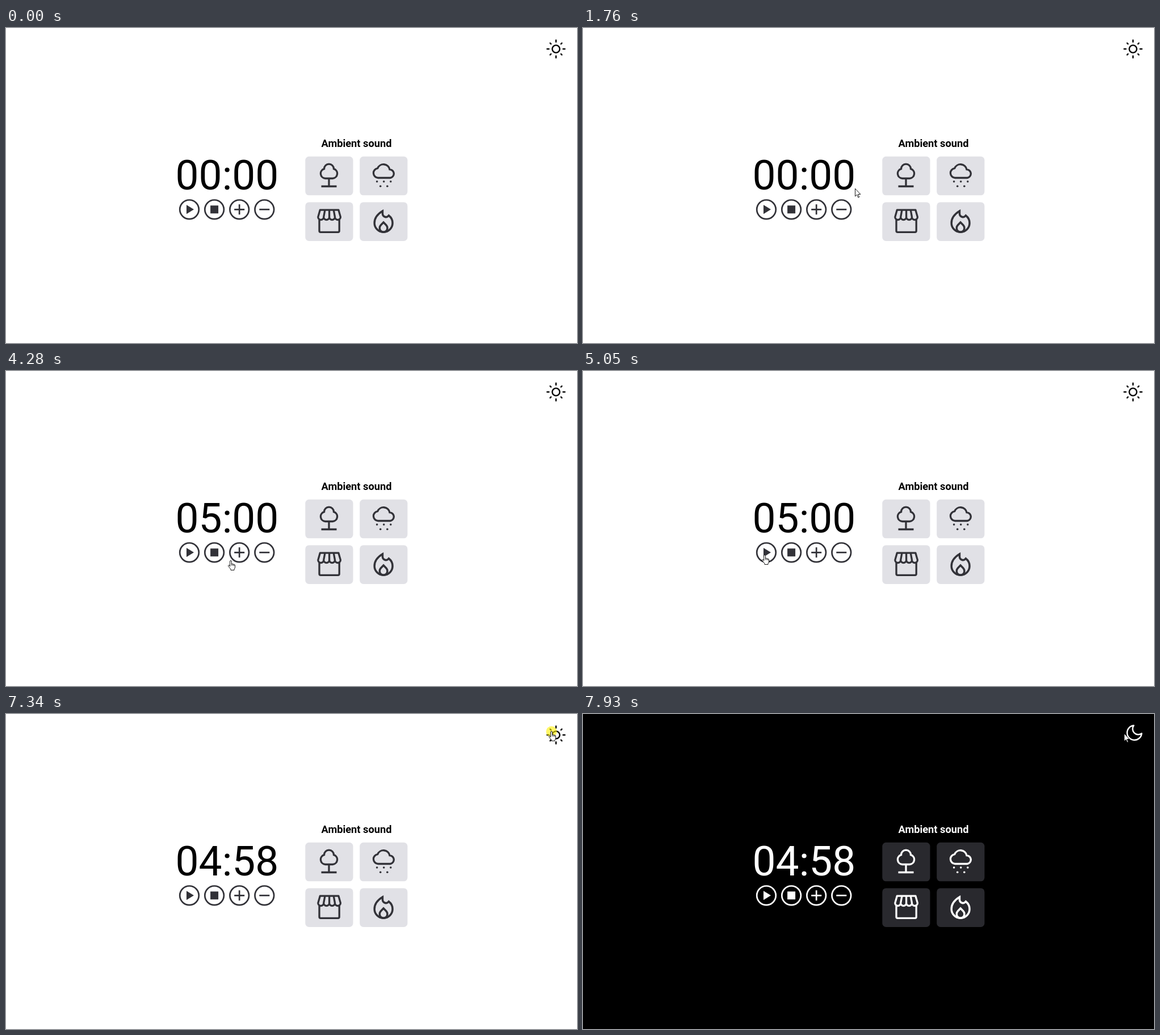
An HTML page that plays this animation: 1006 px wide and 556 px high, repeating every 7990 ms.

```html
<!DOCTYPE html>
<html lang="en">
<head>
<meta charset="utf-8">
<title>Focus timer</title>
<style>
  html, body { margin: 0; width: 100%; height: 100%; overflow: hidden; }
  body { --bg: #fff; --text: #000; --icon: #323238; --tile: #e1e1e6; background: var(--bg); }
  body.dark { --bg: #000; --text: #fff; --icon: #fff; --tile: #29292e; }
  svg { display: block; width: 100%; height: 100%; }
  text { font-family: Roboto, sans-serif; fill: var(--text); text-anchor: middle; }
  #clock { font-size: 73px; }
  #title { font-size: 18.24px; font-weight: 700; }
  .tile { fill: var(--tile); }
  .solid { fill: var(--icon); }
  .line { fill: none; stroke: var(--icon); stroke-width: 2.7; }
  .icon { fill: none; stroke: var(--icon); stroke-width: 3.3; }
  .theme { fill: none; stroke: var(--text); stroke-width: 2.4; stroke-linecap: round; stroke-linejoin: round; }
  .dark #sun, body:not(.dark) #moon { display: none; }
  #click { fill: #fff000; opacity: .6; }
  .pointer { fill: #fff; stroke: #000; stroke-width: .9; stroke-linejoin: round; }
</style>
</head>
<body>
<svg viewBox="0 0 1006 556">
  <text id="clock" x="389.5" y="284.5">00:00</text>
  <text id="title" x="617.5" y="210">Ambient sound</text>
  <g id="controls"></g>
  <g id="tiles"></g>

  <g class="icon">
    <path d="M562.5 265.5a8.6 8.6 0 0 1-2-16.8a8.5 8.5 0 0 1 17 0a8.6 8.6 0 0 1-2 16.8ZM569 266v13M555.5 279.5h27"/>
    <path d="M655.5 264.5a8.5 8.5 0 0 1-.8-16.9a11.2 11.2 0 0 1 21.3 2a7.5 7.5 0 0 1 1 14.9Z"/>
    <path id="store" stroke-linejoin="round"/>
    <g transform="translate(638.7 315.6) scale(2.2)" style="stroke-width:1.6">
      <path d="M11.25 3.4C8 5.4 4.75 8.8 4.75 13a7.25 7.25 0 0 0 14.5 0c0-2.5-1.2-4.6-3.05-6C14.4 9.3 11.25 8 11.25 5.3Z"/>
      <path d="M12 12.5L9.8 14.7A3.2 3.2 0 0 0 8.9 17.2a3.1 3.1 0 0 0 6.2 0A3.2 3.2 0 0 0 14.2 14.7Z"/>
    </g>
  </g>
  <g id="drops" class="solid"></g>

  <g id="sun" class="theme" transform="translate(969 37)"><circle r="6.6"/></g>
  <path id="moon" class="theme" style="stroke-width:1.7" transform="translate(954.3 16) scale(1.43)"
    d="M21 12.8A9 9 0 1 1 11.2 3A7 7 0 0 0 21 12.8Z"/>

  <circle id="click" r="9.5"/>
  <path id="arrow" class="pointer" d="M.5.5V14L3.7 11.2L5.8 16.2L7.8 15.4L5.7 10.5H9.9Z"/>
  <g id="hand" class="pointer">
    <path d="M3.6 11V2a1.4 1.4 0 0 1 2.8 0V7a1.2 1.2 0 0 1 2.3.4a1.2 1.2 0 0 1 2.1.5a1 1 0 0 1 1.7.9V13L11 16v1.5H5V16L.8 10.6a1.2 1.2 0 0 1 2-1.4Z"/>
    <path fill="none" d="M6.4 7v2.5M8.7 7.4v2.3M10.8 8v2"/>
  </g>
</svg>
<script>
const LOOP = 7990, FRAME = 70;
const $ = id => document.getElementById(id);
const add = (parent, tag, attrs) => {
  const node = document.createElementNS('http://www.w3.org/2000/svg', tag);
  for (const name in attrs) node.setAttribute(name, attrs[name]);
  $(parent).append(node);
};

// Areas that show the hand pointer.
const hotAreas = [];
const addHotArea = (x, y, width, height) => hotAreas.push({ x, y, width, height });
addHotArea(954, 20, 33, 34);

// Play, stop, add and subtract, drawn around the button centre.
['M-5-8V8L8 0Z', 'M-7-7H7V7H-7Z', 'M-9 0H9M0-9V9', 'M-9 0H9'].forEach((d, i) => {
  const x = 323 + 44.1 * i, y = 320.3, transform = `translate(${x} ${y})`;
  add('controls', 'circle', { class: 'line', r: 16.8, transform });
  add('controls', 'path', { class: i < 2 ? 'solid' : 'line', d, transform });
  addHotArea(x - 18, y - 18, 36, 36);
});

for (let i = 0; i < 4; i++) {
  const x = 527.3 + 95.9 * (i % 2), y = 226.8 + 80.6 * (i >> 1);
  add('tiles', 'rect', { class: 'tile', x, y, width: 84.2, height: 68.5, rx: 6.5 });
  addHotArea(x, y, 84, 68);
}

const scallops = 'a4.95 4.95 0 0 1-9.9 0'.repeat(4);
$('store').setAttribute('d', `M553.3 321.2H585.9L589.4 333.6${scallops}Z
  M559.7 333.6L562 321M569.6 333.6V321M579.5 333.6L577.2 321
  M552 338V358q0 2.4 2.4 2.4H584.8q2.4 0 2.4-2.4V338`);

for (let row = 0; row < 2; row++)
  for (let i = 0; i < 3 - row; i++)
    add('drops', 'circle', { cx: 653.6 + 12.1 * i + 6.1 * row, cy: 271 + 8.2 * row, r: 1.8 });

for (let i = 0; i < 8; i++)
  add('sun', 'path', { d: `M12.5 0h${i % 2 ? 2.1 : 3.1}`, transform: `rotate(${i * 45})` });

const sun = [961, 31], stop = [370, 323], plus = [416, 323], play = [320, 325];

// Pointer glides: each starts where the one before ended and bows towards `via`.
const glides = [
  { start: 530, end: 1080, via: [968, 46], to: [970, 38] },
  { start: 1280, end: 1970, via: [467, 316], to: [344, 321] },
  { start: 2110, end: 2170, via: stop, to: stop },
  { start: 2370, end: 2720, via: [466, 327], to: plus },
  { start: 4140, end: 4910, via: [378, 355], to: play },
  { start: 6440, end: 6990, via: [950, -50], to: sun },
  { start: 7930, end: 7930, via: sun, to: [953, 34] },
];
glides.forEach((glide, i) => { glide.from = i ? glides[i - 1].to : [931, 44]; });

function pointerAt(t) {
  const glide = glides.filter(g => g.start <= t).pop();
  if (!glide) return null;
  const { start, end, from, via, to } = glide;
  const frames = Math.floor((t - start) / FRAME) + 1;
  const u = Math.min(1, frames * FRAME / (end - start + FRAME)), v = 1 - u;
  return [0, 1].map(i => v * v * from[i] + 2 * u * v * via[i] + u * u * to[i]);
}

// Five quick presses on plus, then play, then the theme switch.
const FIRST_PRESS = 2790, PRESS_GAP = 180, PRESS_HOLD = 90, PLAY = 4980, SWITCH = 7470;
const within = (t, start, length) => t >= start && t < start + length;

function isPressed(t) {
  const since = t - FIRST_PRESS;
  return within(since, 0, 5 * PRESS_GAP) && since % PRESS_GAP < PRESS_HOLD
    || within(t, PLAY, FRAME) || within(t, SWITCH - 130, 130);
}

function clockAt(t) {
  const presses = Math.floor((t - FIRST_PRESS - PRESS_HOLD) / PRESS_GAP) + 1;
  const minutes = Math.max(0, Math.min(5, presses));
  const elapsed = Math.max(0, Math.floor((t - PLAY - 60) / 1000));
  const left = minutes * 60 - Math.min(2, elapsed);
  return [Math.floor(left / 60), left % 60].map(n => String(n).padStart(2, '0')).join(':');
}

const show = (id, visible) => { $(id).style.display = visible ? '' : 'none'; };
const place = (id, x, y) => $(id).setAttribute('transform', `translate(${Math.round(x)} ${Math.round(y)})`);

function draw(t) {
  document.body.classList.toggle('dark', t >= SWITCH);
  $('clock').textContent = clockAt(t);
  const point = pointerAt(t);
  const [x, y] = point || [0, 0];
  const hot = hotAreas.some(a => within(x, a.x, a.width) && within(y, a.y, a.height));
  show('arrow', point && !hot);
  show('hand', point && hot);
  show('click', isPressed(t));
  place('arrow', x, y);
  place('hand', x - 5, y - 1);
  place('click', x, y);
}

const origin = performance.now();
function tick() {
  draw((performance.now() - origin) % LOOP);
  requestAnimationFrame(tick);
}
tick();
</script>
</body>
</html>
```
